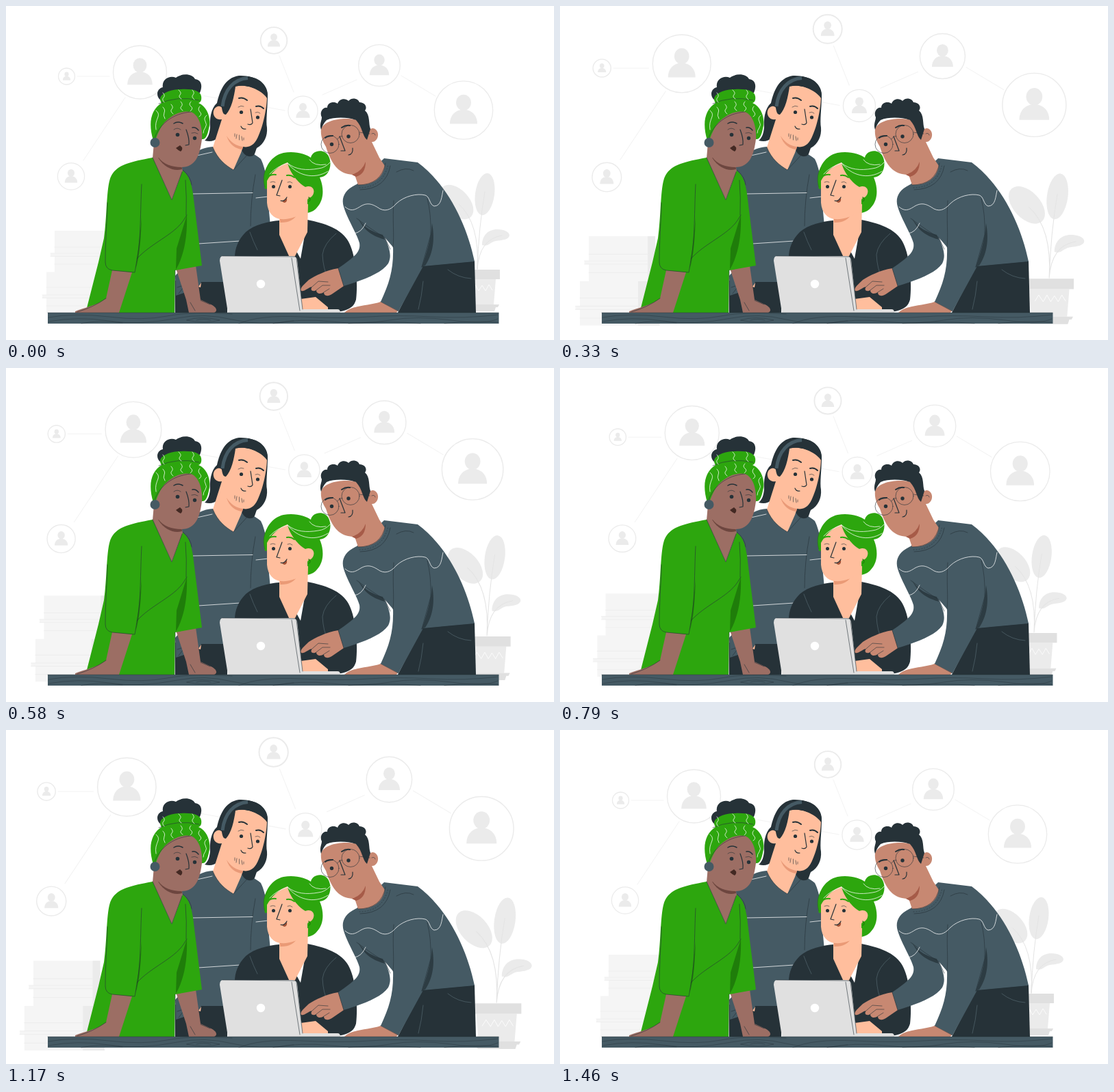
Write an HTML page that moves like this. It is 800 px wide and 489 px high and loops after 1500 ms.

```html
<!DOCTYPE html>
<html lang="en">
<head>
<meta charset="utf-8">
<title>Team around a laptop</title>
<style>
html, body { margin: 0; width: 100%; height: 100%; overflow: hidden; background: #fff }
svg { display: block; width: 100vw; height: 100vh }
.dark { fill: #263238 } .slate { fill: #455a64 } .green { fill: #2da60e } .deep { fill: #1f7d0a }
.fair { fill: #ffbe9d } .tan { fill: #c78872 } .brown { fill: #9c6e64 }
.leaf { fill: #ebebeb } .paper { fill: #f5f5f5 } .grey { fill: #e0e0e0 }
.line, .thin, .white, .brow, .pale { fill: none; stroke: #263238; stroke-linecap: round; stroke-linejoin: round }
.line { stroke-width: 1.2 }
.thin { stroke-width: .6 }
.brow { stroke-width: 2 }
.white { stroke: #fff; stroke-width: .75 }
.pale { stroke: #e4e4e4; stroke-width: 1 }
</style>
</head>
<body>
<svg viewBox="0 0 800 489">
<g id="backdrop">
  <path class="pale" style="stroke:#f3f3f3" d="M104 103H151M174 134L113 226M289 131.500L407 153M399 73L420 126M462 130L512 108M577 102L627 132"/>
  <g id="contacts"></g>

  <path class="paper" d="M71 329H160V389.500H71ZM59 389.500H166V449H59ZM65 362H160V366.500H65ZM53 423H160V427.500H53Z"/>
  <path class="leaf" d="M150 329H160V389.500H150ZM137 389.500H166V449H137Z"/>
  <path class="pale" style="stroke:#ebebeb;stroke-width:.7" d="M71 353H150M65 362H150M65 366.500H150M71 378H150M59 412H137M53 423H137M53 427.500H137M59 439H137"/>

  <ellipse class="leaf" cx="699" cy="275.500" rx="14" ry="31" transform="rotate(8 699 275.500)"/>
  <ellipse class="leaf" cx="658" cy="287" rx="18" ry="30" transform="rotate(-43 658 287)"/>
  <path class="leaf" d="M695 350C695 336 704 327 717 327C728 327 735 331 735 336C734 342 724 343 715 344C706 346 704 353 695 350Z"/>
  <path class="pale" d="M688 385Q690 325 699 272M688 385Q692 318 661 290M688 385Q691 341 724 336"/>
  <path class="leaf" d="M661 400H715L712 437H664Z"/>
  <path class="grey" d="M655 386H721V400H655ZM658 437H720L718 441H715L713 447H663L658 441Z"/>
  <path class="white" d="M669 416L674 408L680 417L685 408L690 417L695 409L700 417L705 408L710 416"/>
</g>

<!-- long-haired man -->
<g>
  <path class="dark" d="M247 402H323V449H247Z"/>
  <path class="slate" d="M303 206C285 206 262 220 254 240L260 380L247 395L248 424L280 413L285 404H336L338 360L386 322L383 290C383 265 380 240 372 224C364 217 356 214 346 210Z"/>
  <path class="fair" d="M281 411L285 405L284 412Z"/>
  <path class="dark" d="M382 130C382 112 362 101 340 102C319 105 312 125 308 142C299 150 297 166 298 178C297 187 295 193 290 197C298 199 304 198 309 193L343 207C345 216 351 221 358 220C364 219 363 215 366 208C377 202 382 190 381 178C379 168 382 150 382 130Z"/>
  <path class="fair" d="M333 118C345 114 365 118 381 132C381 150 375 176 369 189C364 202 357 208 346 206L343 215L332 240C320 233 309 224 302 207L315 166C301 168 299 150 309 147C313 146 316 149 318 153L321 158C326 148 329 135 333 118Z"/>
  <path fill="#e99a78" d="M322 190C328 200 337 205 346 206L345 210C335 209 326 203 322 190Z"/>
  <path class="dark" d="M315 149C315 120 335 104 352 103C372 105 383 117 382 136C374 124 353 113 335 118C333 133 329 151 321 159C317 159 316 155 315 149Z"/>
  <path fill="none" stroke="#455a64" stroke-width="5" d="M353 105.500C333 107 319 122 316 147"/>
  <path class="brow" d="M340 135Q346 133 352 138M365 147Q371 145 376 150"/>
  <path class="line" d="M357 151L360 171Q358 175 353 173M343 176Q345 181 350 180"/>
  <path class="thin" d="M339 148Q343 145 347 147M364 156Q368 154 371 157M334 187V191M337 188L336 194M340.500 189V196M344 191L345 197M347 193V196M356 214L332 240C320 233 309 224 302 207M364 247Q357 285 357 322M258 240Q270 250 271 262M250 412L262 408L252 421"/>
  <circle class="dark" cx="343.500" cy="155.500" r="2.600"/><circle class="dark" cx="367.500" cy="163" r="2.600"/>
  <path class="white" d="M274 220L301 214M273 275L360 273.500M365 281L383 279M281 348L357 343"/>
</g>

<!-- woman in green -->
<g>
  <path class="dark" d="M226 138C218 132 220 121 229 119C227 108 238 101 248 105C257 98 272 99 276 107C286 108 287 118 283 127Z"/>
  <path class="green" d="M215 197C207 170 212 152 227 142C219 130 238 122 255 122C272 121 284 124 285 132C286 138 284 141 281 142C295 148 300 166 296 180C294 190 291 196 286 195L250 175Z"/>
  <path class="brown" d="M216 200L214 223L242 284L258 242L256 230Z"/>
  <path fill="#6d463f" d="M222 222C232 238 246 242 257 239L256 230Z"/>
  <path class="brown" d="M217 204C218 192 224 181 230 172C239 161 256 152 270 155C283 160 287 180 286 195C283 218 277 236 256 236C242 236 229 231 223 222Z"/>
  <path class="thin" d="M223 143Q250 131 282 138M217 193C223 175 242 157 270 155"/>
  <path class="white" d="M229 127q4 4 1 7t1 7M252 123q5 4 2 7t2 6M272 123q4 4 1 7t2 7M219 153q5 4 3 9t-3 9 0 10M229 148q4 4 2 8t1 9M241 144q4 4 1 7t2 7M255 140q4 4 1 7t2 6M270 140q-4 4 0 7t-1 7M283 147q-4 4 0 8t-1 7M293 160q-5 4-2 9t0 9-3 8"/>
  <circle class="slate" cx="217.500" cy="200" r="7"/>
  <path class="brow" style="stroke-width:1.5" d="M245 172Q251 168 258 172M272 178Q277 177 281 182"/>
  <path class="line" d="M263 181Q268 194 267 203L262 204"/>
  <path class="thin" d="M245 181Q250 177 255 181M271 186Q276 184 280 187"/>
  <circle class="dark" cx="250.500" cy="188.500" r="2.800"/><circle class="dark" cx="275.500" cy="193.500" r="2.700"/>
  <path fill="#432923" d="M248 208L254 204L257 207Q258 211 255 213Q252 212 248 208Z"/>
  <path class="brown" d="M248 384L263 430L267 449H304C310 446 307 440 297 436L284 430L277 380Z"/>
  <path class="green" d="M214 222C182 228 163 232 154 248C146 262 148 305 143 340L135 375L118 442L121 449H246L247 387L286 380L273 275C271 262 268 248 258 241L242 284Z"/>
  <path class="brown" d="M155 387L146 428C132 439 112 442 101 447V449H165L184 390Z"/>
  <path class="deep" d="M198 310C197 335 196 365 189 386L193 356ZM264 306C265 338 260 365 248 386L249 355Z"/>
  <path class="thin" d="M198 261C196 300 197 340 192 366L188 390L155 387Q145 385 145 375C145 340 148 310 148 288M191 370C212 347 245 335 259 314L264 306M214 222L242 284L257 243M262 255Q264 280 263 306M146 428Q128 441 104 448M284 431L298 437M276 446L269 434M247 387V448"/>
</g>

<!-- seated woman -->
<g>
  <path class="dark" d="M399 314C385 315 362 320 350 331C339 342 334 355 334 368L330 449H475C492 447 507 445 511 430C514 405 511 365 500 345C490 326 465 318 440 313L430 370Z"/>
  <path class="thin" style="stroke:#5c6f78" d="M356 331Q361 345 367 357M482 333Q464 348 462 364Q463 385 470 398"/>
  <path class="green" d="M378 268C372 243 384 220 405 215C423 212 438 217 445 222C447 211 465 208 471 220C477 232 472 250 458 251C464 265 465 283 454 295C450 300 445 302 440 303L410 262Z"/>
  <path class="fair" d="M399 302V335L414 368H421L440 331L441 290Z"/>
  <path fill="#ea9a76" d="M400 311Q415 311 426 304Q418 318 400 317Z"/>
  <path class="fair" d="M381 256C386 246 398 233 411 229C413 242 426 259 437 265C447 261 453 270 447 278C445 281 441 280 440 284V298C428 309 412 313 401 312C391 311 382 303 381 288Z"/>
  <path class="thin" d="M381 237C374 247 376 258 378 265" style="stroke:#1f7d0a"/>
  <path class="white" d="M411 230C423 240 439 241 456 238Q466 237 473 229M411 230C425 248 449 255 470 242M443 225Q450 235 467 232M411 230Q395 235 385 246"/>
  <path class="brow" style="stroke:#2da60e" d="M384 249Q389 246 394 247M410 248Q416 247 421 251"/>
  <path class="line" d="M403 255L395 277L400 278"/>
  <path class="thin" d="M386 258Q390 256 393 258M411 258Q415 256 418 259"/>
  <circle class="dark" cx="390.500" cy="264.500" r="2.500"/><circle class="dark" cx="414.500" cy="264.500" r="2.500"/>
  <path fill="#a35236" d="M403 286Q407 285 410 281Q411 288 406 288Z"/>
  <path class="line" d="M401 285Q406 287 410 280"/>
  <path class="line" style="stroke:#1f7d0a" d="M442 280Q446 284 442 286"/>
  <path class="fair" d="M430 429L452 426L470 441V444H431Z"/>
</g>

<!-- man with glasses -->
<g>
  <path class="dark" d="M608 379L684 373L686 449H572Z"/>
  <path class="slate" d="M512 261C494 269 489 281 493 294C498 311 512 333 516 347C518 359 510 367 485 384L493 410C525 400 548 391 558 377C563 367 561 357 553 339L565 353C566 385 560 405 547 433L573 447L609 381L684 374C673 320 645 262 601 229L552 223Z"/>
  <path fill="#2d3c43" d="M514 311C524 326 536 331 550 335L553 342C540 338 525 333 514 311ZM622 318C620 345 612 367 607 382L612 380C622 365 627 345 622 318Z"/>
  <path class="tan" d="M460 180C465 166 495 162 513 167C520 175 522 185 527 192C528 180 535 176 540 181C547 188 541 200 534 199L545 222L553 234C550 255 530 263 514 262L509 247C500 247 492 245 485 239C476 231 470 216 467 206C462 198 459 190 460 180Z"/>
  <path fill="#a65b48" d="M505 247Q520 242 525 228Q525 246 511 250Z"/>
  <path class="dark" d="M460 181C457 173 461 168 461 163C457 156 463 147 469 149C469 141 479 139 484 143C486 136 495 134 500 139C505 133 514 135 516 141C524 141 528 148 524 153C532 160 529 172 532 180L527 196C520 190 521 178 511 167C500 163 480 162 468 167Q463 172 460 181Z"/>
  <path class="brow" d="M466 193Q470 190 477 190M490 178Q496 174 502 175"/>
  <path class="line" d="M487 191L495 212L489 212M500 218Q507 217 506 208"/>
  <g class="thin"><circle cx="473" cy="202.500" r="13"/><circle cx="503" cy="187.500" r="13"/><path d="M484 195Q487 189 491 191M516 185L531 187M534 187Q538 185 539 189"/></g>
  <circle class="dark" cx="475.500" cy="202.500" r="2.700"/><circle class="dark" cx="500" cy="191" r="2.700"/>
  <path class="thin" d="M514 262Q548 262 554 230M517 269Q555 268 561 234M570 243Q584 235 595 241M566 285C564 315 567 335 565 353M615 282Q621 305 620 335L607 382M512 311Q536 329 553 339L561 356M607 382L682 375"/>
  <path class="thin" stroke-dasharray="1 3" d="M516 266Q550 266 558 232"/>
  <path class="thin" style="stroke:#5c6f78" d="M609 403Q607 425 602 444M645 386Q660 398 679 399"/>
  <path class="white" d="M495 294C504 302 510 298 518 293C530 286 538 292 546 297C556 302 564 296 570 289C582 278 600 274 612 277C619 279 618 291 625 293C636 293 636 278 638 270M508 333Q519 332 525 318"/>
  <path class="tan" d="M494 449C504 438 530 439 547 433L572 446L570 449Z"/>
  <path class="thin" d="M547 433L573 447"/>
</g>

<!-- laptop -->
<path class="grey" d="M316 366H419Q424 367 425 371L433 444H484Q488 444 488 449H324L312 373Q312 367 316 366Z"/>
<path class="thin" d="M417 369L429 446M424 369L433 444M316 366L422 367"/>
<circle cx="372" cy="407" r="6.200" fill="#fff"/>

<path class="tan" d="M485 384C467 387 451 395 442 401C436 407 428 413 431 417C435 419 441 412 447 411C443 416 448 419 453 416C453 422 460 422 464 419C464 426 472 425 477 421L493 410Z"/>
<path class="thin" d="M447 411L456 403L470 404M453 416L462 409L473 409M464 419L472 414M485 384L493 410"/>

<!-- desk -->
<path class="slate" d="M61 449H719.500V465H61Z"/>
<path class="thin" opacity=".7" d="M61 449H719M62 456Q100 449 150 455T235 454T330 451M62 462Q105 454 150 461T250 457Q290 449 330 459T420 461M110 465Q135 459 170 464M264 460Q285 453 312 460Q290 466 264 460ZM278 460Q289 457 299 460M340 465Q370 452 430 455T530 455T620 455T718 452M390 465Q430 457 475 462T560 460T650 460T718 458M500 465Q560 460 605 465M640 465Q680 460 718 463"/>
</svg>

<script>
const contacts = [
  // x, y, radius, stroke width
  [88.5, 103, 12, 1.3], [195.5, 97, 39, 1.3], [391, 50.5, 19.3, 1.8], [433.5, 153.5, 21.6, 1.2],
  [545, 87, 30.3, 1.3], [668, 152.5, 42.7, 1.3], [95, 249.5, 19.6, 1.3]
];
document.getElementById('contacts').innerHTML = contacts.map(([x, y, r, w]) => `
  <g transform="translate(${x} ${y}) scale(${r})" fill="#ebebeb">
    <circle r="1" fill="#fff" stroke="#ebebeb" stroke-width="${w / r}"/>
    <ellipse cy="-.26" rx=".255" ry=".275"/>
    <path d="M-.47 .47C-.47 .15 -.25 -.02 0 -.02S.47 .15 .47 .47Z"/>
  </g>`).join('');

const LOOP = 1500, STEP = 1000 / 24, GROWTH = 0.096;
const CENTER = [394.7, 238];
// Two beats: a quick swell with a slow release, then an even one.
const beats = [[0, 0], [7, 1], [21, 0], [28, 1], [35, 0], [36, 0]];
const backdrop = document.getElementById('backdrop');

function swell(step) {
  const i = beats.findIndex(([end]) => step < end);
  const [a, from] = beats[i - 1], [b, to] = beats[i];
  return from + (to - from) * (step - a) / (b - a);
}

function draw(now) {
  const step = Math.floor((now % LOOP + 4.2) / STEP) % 36;
  const scale = 1 + GROWTH * swell(step);
  const [x, y] = CENTER;
  backdrop.setAttribute('transform', `translate(${x} ${y}) scale(${scale}) translate(${-x} ${-y})`);
  requestAnimationFrame(draw);
}
draw(performance.now());
</script>
</body>
</html>
```
